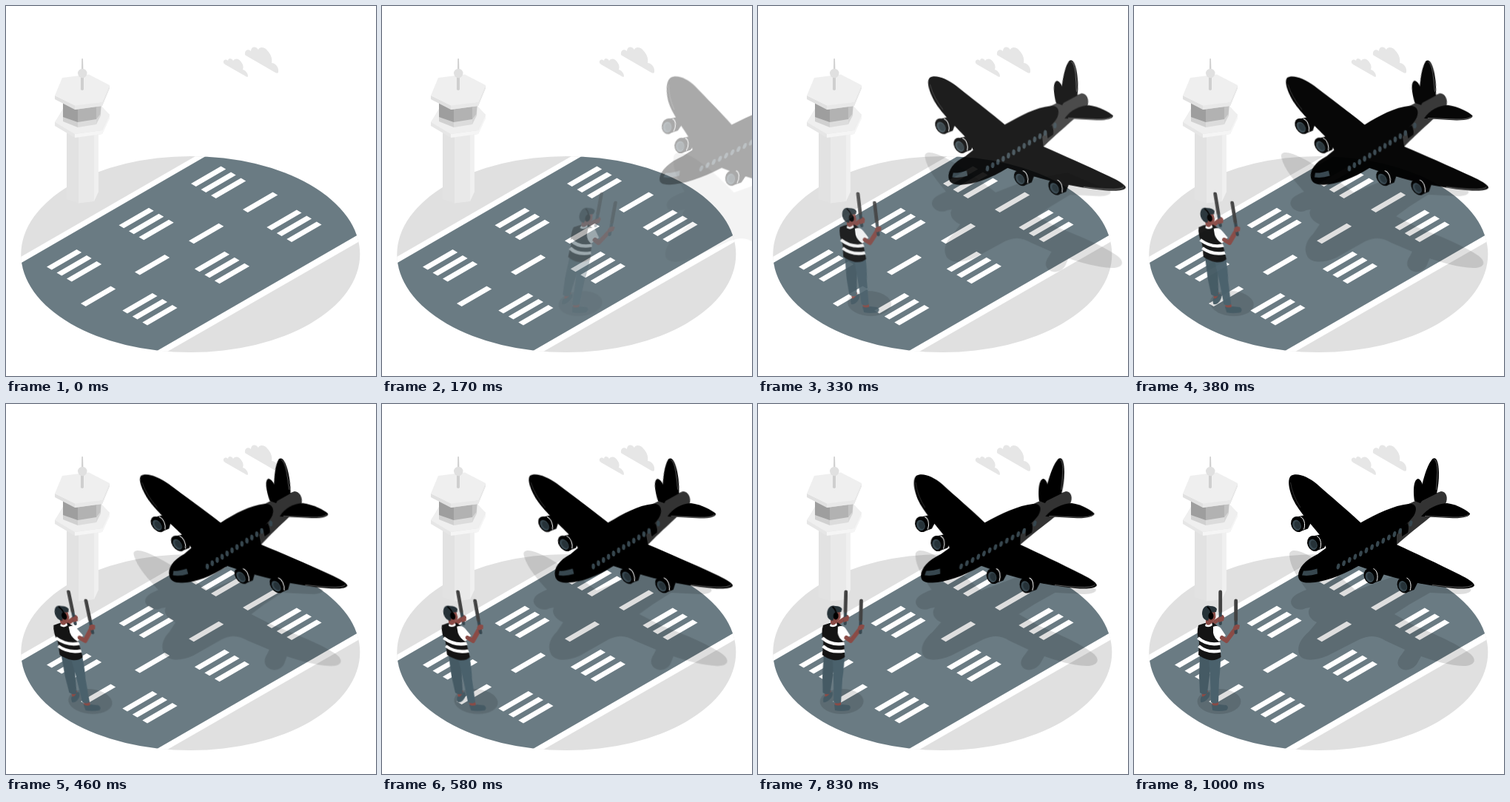
Animation of 500 by 500 pixels, one loop 1040 ms. Source, as an HTML page:

```html
<!DOCTYPE html>
<html lang="en">
<head>
<meta charset="utf-8">
<title>Runway</title>
<style>
  html, body { margin: 0; width: 100%; height: 100%; overflow: hidden; background: #fff; }
  svg { display: block; width: 100vw; height: 100vh; }
  .fly { transform-box: view-box; opacity: 0; }
  #shade { transform-origin: 0 308px; }
  #plane { transform-origin: 0 165px; }
  #man { transform-origin: 0 334px; }
</style>
</head>
<body>
<svg viewBox="0 0 500 500" xmlns="http://www.w3.org/2000/svg">
  <defs>
    <clipPath id="disc"><ellipse cx="249.3" cy="335.5" rx="229" ry="132.5"/></clipPath>
    <g id="engine">
      <path d="M-3-9.500L8-12L20-6L14 6L3 10Z"/>
      <ellipse rx="8.600" ry="10.800" transform="rotate(-22)"/>
      <path d="M4-10C9-8 11 0 8.500 7" fill="none" stroke="#fff" stroke-width="1"/>
      <ellipse cx="-1.500" cy=".8" rx="5.600" ry="7.400" transform="rotate(-22)" fill="#37474f"/>
      <ellipse cx="-.5" cy="1" rx="3.800" ry="5.400" transform="rotate(-22)" fill="#263238"/>
    </g>
  </defs>

  <!-- ground -->
  <g clip-path="url(#disc)">
    <rect width="500" height="500" fill="#e0e0e0"/>
    <path d="M0 350.500L264 198.400L500 190V305.300L205 474.500L0 500Z" fill="#fff"/>
    <path d="M0 359.200L284 194.800L500 190V295L180 479.900L0 500Z" fill="#6a7b83"/>
  </g>
  <path id="stripes" fill="#fff"/>

  <!-- clouds -->
  <g fill="#e6e6e6">
    <path d="M323 66C322 60 327 57 331 61C331 55 337 53 341 59C343 54 350 56 353 60C358 65 360 71 359 77C364 77 369 83 368 89C368 91 366 91 364 90L326 68Z"/>
    <path d="M294 77C293 73 297 71 300 74C300 70 305 70 307 74C310 69 316 72 318 76C321 80 321 83 320 86C324 87 327 91 327 95C327 96 325 96 324 95L296 79Z"/>
  </g>

  <path id="shade" class="fly" fill-opacity=".13" d="M210 205C209 198 216 196 226 200C245 207 275 230 300 252L345 235L400 225L455 250C457 254 450 257 440 257L400 255L372 271L352 284L380 300C410 312 440 326 455 338C464 346 460 354 445 354C425 353 405 347 388 341L383 350C378 359 366 362 360 357C354 352 356 345 362 338L366 332L340 320C328 313 320 312 305 318L262 340C245 347 230 348 224 340C219 330 224 318 236 308L247 295C240 292 232 284 238 275L232 276C222 281 212 275 212 267C213 260 220 256 233 251C222 236 211 220 210 205Z"/>

  <!-- tower -->
  <g>
    <path d="M82 165H98V266.500L82 261Z" fill="#e2e2e2"/>
    <path d="M98 165H119V264L98 266.500Z" fill="#e9e9e9"/>
    <path d="M119 165H125V251L119 264Z" fill="#f0f0f0"/>
    <path d="M66 157L78 139L128 136L140 147V151L130 173L93 178L66 162Z" fill="#e6e6e6"/>
    <path d="M93 173L130 168L140 147V152L130 173L93 178Z" fill="#f5f5f5"/>
    <path d="M66 157L78 137L129 135L140 147L130 168L93 173Z" fill="#efefef"/>
    <path d="M77 130L97 137V164L77 156Z" fill="#d0d0d0"/>
    <path d="M97 137L122 134V160L97 164Z" fill="#dcdcdc"/>
    <path d="M122 134L129 129L128 148L122 160Z" fill="#d6d6d6"/>
    <path d="M77 130L97 137V157L77 150Z" fill="#9e9e9e"/>
    <path d="M97 137L122 134V153L97 157Z" fill="#b2b2b2"/>
    <path d="M122 134L129 129L127.500 146L122 153Z" fill="#c2c2c2"/>
    <path d="M66 121L93 134L130 130L140 107V111L130 135L93 140L66 126Z" fill="#e0e0e0"/>
    <path d="M93 134L130 130L140 107V111L130 135L93 140Z" fill="#e8e8e8"/>
    <path d="M66 121L76 97L112 92.500L140 107L130 130L93 134.500Z" fill="#efefef"/>
    <path d="M101 95H105V113Q103 115 101 113ZM102.300 71.500Q103 70 104 71.500L104.500 88H102Z" fill="#cfcfcf"/>
    <circle cx="103.300" cy="91" r="6.200" fill="#e0e0e0"/>
  </g>

  <g id="plane" class="fly">
    <g transform="translate(-1 0)">
      <!-- fuselage and tail -->
      <path d="M340 150L381 131L416 118C423 118 426 127 422 135C408 149 382 167 354 192Z" fill="#333"/>
      <path d="M380 131C378 115 379 102 385 101C391 103 392 113 394 125L388 134Z"/>
      <path d="M386 133C389 110 396 83 404.500 74C410 71 412.500 79 413 92C413 104 412 112 410 121Z"/>
      <path d="M389 152C399 140 411 135 424 134C438 136 450 143 455 148C455 152 446 154.500 432 154.300Z"/>
      <path d="M223 232C223 222 232 211 249 203L308 160C330 148 352 137 372 135C380 134 384 139 381 147C378 157 362 166 356 177V191L304 219C280 233 256 241 239 241.500C228 242 223 239 223 232Z"/>
      <!-- wings -->
      <path d="M308 161C290 144 266 124 248 108C236 98 221 92 213 97C208 102 210 115 216 129C224 146 243 165 256 182L264 204L290 190Z"/>
      <path d="M302 218L356 190C380 201 412 216 440 230C452 236 460 241 461 245C459 250 445 250 432 249C392 245 350 236 302 218Z"/>
      <g fill="none" stroke="#fff" stroke-opacity=".6" stroke-width=".6">
        <path d="M394 151.500L432 153Q449 153.500 453 149.500M407 75Q411 77 411 92L409.500 116"/>
        <path d="M404 244.500Q440 249 452 247Q458 246 458.500 244"/>
        <path d="M212.500 106Q215 123 226 140" stroke-opacity=".3"/>
      </g>
      <use href="#engine" x="222" y="162.500"/>
      <use href="#engine" x="244" y="188.500"/>
      <use href="#engine" x="320.500" y="232.500"/>
      <use href="#engine" x="365.500" y="245"/>
      <path d="M230 225.500Q238 226 248.500 222.500L249 229.500Q238 233 228 231.500Z" fill="#37474f"/>
      <path d="M363 166L371 161Q373 169 371 174L363 179Z"/>
      <g id="panes" fill="#37474f"></g>
    </g>
  </g>

  <g id="man" class="fly">
    <ellipse cx="115" cy="402" rx="29.500" ry="17" fill-opacity=".13"/>
    <!-- legs -->
    <path d="M92 387H100L99 397H92ZM105 400H114V408H106Z" fill="#8a4b46"/>
    <path d="M91 395Q95 397 99 390L102 389Q104 393 100 398Q95 404 90 403Q89 399 91 395Z" fill="#455a64"/>
    <path d="M105 406Q110 409 115 406L125 407Q129 410 125 414Q114 416 106 414Z" fill="#455a64"/>
    <path d="M89 338L106 343L102 367L99 391Q94 394 89 390L88 368Z" fill="#455a64"/>
    <path d="M101 342L117 341Q117 358 115 372L114 403Q109 406 104 403L103 372Z" fill="#4a616c"/>
    <!-- far arm and baton -->
    <path d="M104 298L119 288" stroke="#8a4b46" stroke-width="5.500" stroke-linecap="round"/>
    <path d="M116.700 281V297" stroke="#37474f" stroke-width="4.200" stroke-linecap="round"/>
    <path d="M116.700 254V280" stroke="#424242" stroke-width="4.800" stroke-linecap="round"/>
    <path d="M114 290Q117 285 122 288L121 293L115 295Z" fill="#8a4b46"/>
    <!-- torso -->
    <path d="M87 299Q94 296 104 294Q113 298 117 306L116 323L117.500 342Q112 347 102 346Q93 344 87 339L88 322Q84 309 87 299Z" fill="#141414"/>
    <path d="M86.500 316Q99 327 116.500 323.500M87.500 327Q99 337 117 333.500" fill="none" stroke="#fff" stroke-width="4.300"/>
    <path d="M107 301Q114 298 118 304L124 313L115 321Q108 316 107 309Z" fill="#fff"/>
    <path d="M119 316L125 320L137 304" fill="none" stroke="#8a4b46" stroke-width="6" stroke-linejoin="round" stroke-linecap="round"/>
    <path d="M137.700 294V309" stroke="#37474f" stroke-width="4.200" stroke-linecap="round"/>
    <path d="M137.700 266V292" stroke="#424242" stroke-width="4.800" stroke-linecap="round"/>
    <path d="M134 302Q137 296 143 299L142 304L136 306Z" fill="#8a4b46"/>
    <!-- head -->
    <path d="M97 288H106V297Q101 301 97 297Z" fill="#8a4b46"/>
    <path d="M99 279H109.500L110.500 288Q109 295 102 293Z" fill="#8a4b46"/>
    <path d="M97 297Q101 301 105 296L106 299Q101 303 96 300Z" fill="#fff"/>
    <path d="M92 284C92 275 97 271 103 273Q110 273 112 277L111 281L104 282L100 293Q93 292 92 284Z" fill="#263238"/>
    <path d="M99 274Q104 278 104.500 284" fill="none" stroke="#000" stroke-width="1.800"/>
    <ellipse cx="104" cy="286.500" rx="3.500" ry="5"/>
  </g>
</svg>
<script>
  const LOOP = 1040, STEP = 1000 / 24;
  const $ = id => document.getElementById(id);

  // runway markings
  const bar = (x, y) => `M${x} ${y}l40.500-23.500 6.700 4-40.500 23.500z`;
  let marks = '';
  for (let i = 0; i < 3; i++) {
    for (let k = 0; k < 3; k++) {
      const dx = k * 13.500 - i * 97.500, dy = k * 8 + i * 56.300;
      marks += bar(250 + dx, 240 + dy) + bar(352.300 + dx, 299 + dy);
    }
  }
  for (let i = 0; i < 4; i++) marks += bar(320 - i * 73, 275 + i * 42.300);
  $('stripes').setAttribute('d', marks);

  // cabin windows
  const pane = (x, y) => `<ellipse rx="2.200" ry="4" transform="translate(${x} ${y}) rotate(14)"/>`;
  let panes = pane(375, 161.500);
  for (let i = 0; i < 12; i++) panes += pane(277 + i * 7.600, 219.500 - i * 4.350);
  $('panes').innerHTML = panes;

  // slide in from the right, lean, settle
  const easing = 'cubic-bezier(.36, -.01, .5, 1.38)';
  const poses = [
    { offset: 0, transform: 'translate3d(250px, 0, 0) skewX(-20deg)', opacity: 0, easing },
    { offset: .6, transform: 'skewX(10deg)', opacity: 1, easing },
    { offset: .8, transform: 'skewX(-2deg)', opacity: 1, easing },
    { offset: 1, transform: 'translate3d(0, 0, 0)', opacity: 1 }
  ];
  const moves = ['shade', 'plane', 'man'].map(id => {
    const move = $(id).animate(poses, { duration: 1000, fill: 'both' });
    move.pause();
    return move;
  });

  const start = performance.now();
  function draw() {
    const t = Math.max(0, performance.now() - start) % LOOP;
    const tick = Math.min(24, Math.floor((t + 6) / STEP)); // 24 pictures a second
    const at = Math.min(1000, tick * STEP + 18);
    moves.forEach(move => { move.currentTime = at; });
    requestAnimationFrame(draw);
  }
  draw();
</script>
</body>
</html>
```
